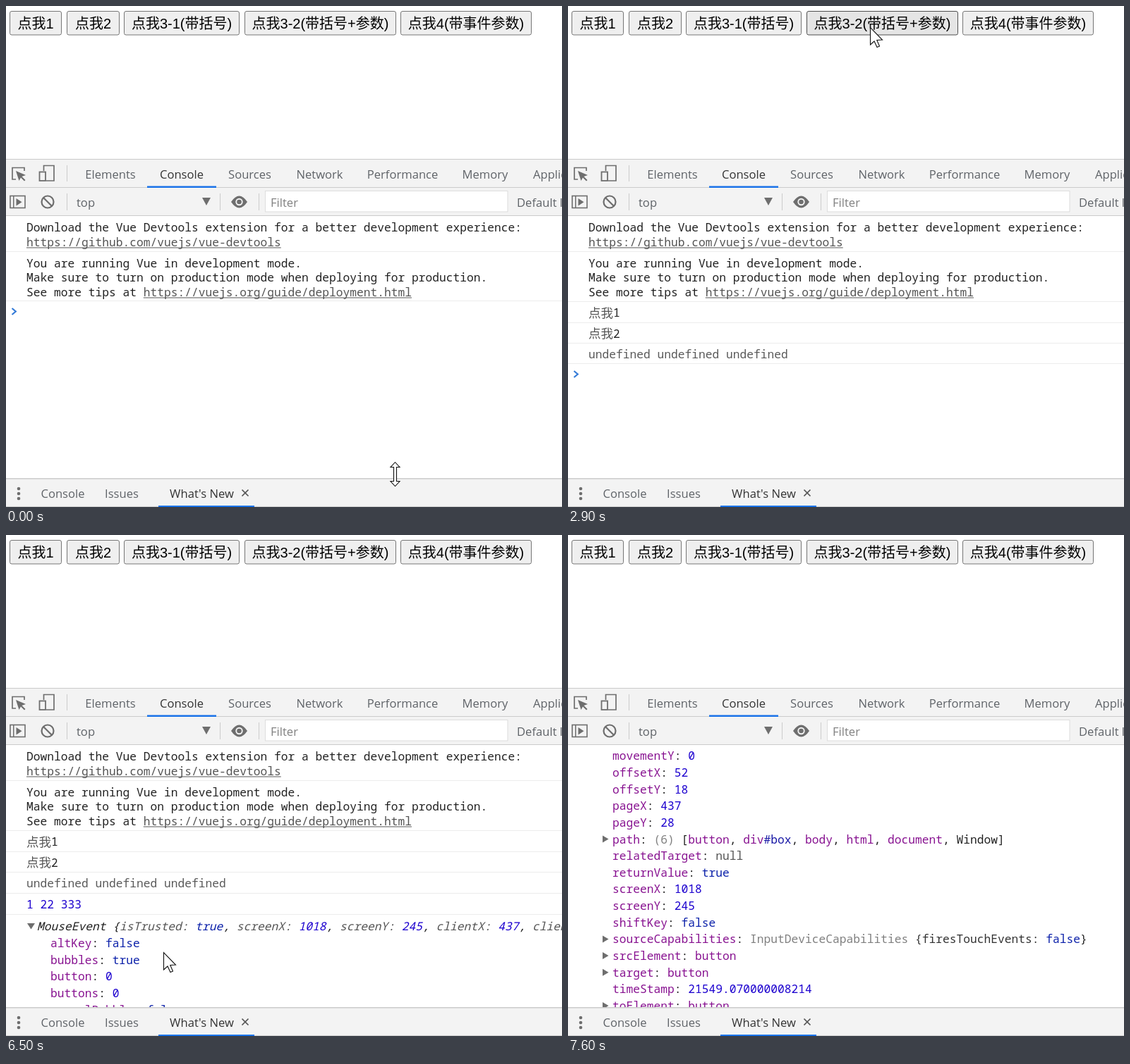
Write an HTML page with a canvas that moves like this. It is 788x711 px and loops after 8400 ms.

```html
<!DOCTYPE html>
<html lang="zh">
<head>
<meta charset="utf-8">
<title>Event handling demo</title>
<style>
html, body { margin: 0; width: 100%; height: 100%; overflow: hidden; background: #fff; }
canvas { display: block; }
</style>
</head>
<body>
<canvas id="stage" width="788" height="711"></canvas>
<script>
const ctx = document.getElementById('stage').getContext('2d');
const W = 788, H = 711, LOOP = 8400, STEP = 100;

const CJK = '"Noto Sans CJK SC", "Noto Sans CJK JP", "Noto Sans CJK"';
const UI = '16.6px "Open Sans", "Noto Sans", sans-serif';
const BUTTON = `20px "Liberation Sans", ${CJK}, sans-serif`;
const MONO = '16.25px "Noto Sans Mono", monospace';
const HAN = `300 17.5px ${CJK}, sans-serif`;

const INK = '#222', GRAY = '#565656', PURPLE = '#881391', NUM = '#1c00cf', BOOL = '#0d22aa';
const ICON = '#6e6e6e', BLUE = '#1a73e8', BAR = '#f3f3f3', EDGE = '#cbcbcb';

const buttons = [
  [5, 74, '点我1'], [86, 75, '点我2'], [167, 164, '点我3-1(带括号)'],
  [338, 215, '点我3-2(带括号+参数)'], [559, 186, '点我4(带事件参数)']
];
const clicks = [800, 1300, 2300, 3300, 4300];
const EXPAND = 5900;

// time, x, y of the pointer tip
const pointer = [
  [0, 551, 664], [300, 330, 350], [600, 55, 45], [700, 42, 30], [800, 44, 29], [900, 80, 30],
  [1000, 108, 30], [1300, 125, 29], [1600, 150, 30], [1700, 150, 30], [1900, 215, 30],
  [2000, 215, 30], [2100, 222, 29], [2600, 222, 29], [2900, 428, 30], [3300, 430, 31],
  [3800, 641, 36], [4300, 641, 36], [4500, 190, 562], [4900, 190, 562], [5100, 120, 605],
  [5300, 67, 563], [5500, 33, 555], [5900, 34, 555], [6000, 208, 590], [6200, 208, 590],
  [6500, 223, 592], [6800, 245, 590], [7100, 361, 573], [7600, 810, 560]
];
const scroll = [[6500, 0], [6700, 140], [6800, 140], [7100, 465.8], [7600, 739]];

const props = `altKey false,bubbles true,button 0,buttons 0,cancelBubble false,cancelable true,
clientX 437,clientY 28,composed true,ctrlKey false,currentTarget null,defaultPrevented false,
detail 1,eventPhase 0,fromElement null,isTrusted true,layerX 437,layerY 28,metaKey false,
movementX 0,movementY 0,offsetX 52,offsetY 18,pageX 437,pageY 28,path ,relatedTarget null,
returnValue true,screenX 1018,screenY 245,shiftKey false,sourceCapabilities ,srcElement button,
target button,timeStamp 21549.070000008214,toElement button`
  .split(',').map(p => p.trim().split(' '));

const rich = {
  path: [['(6) ', '#808080'], ['[', INK], ['button', PURPLE], [', ', INK], ['div', PURPLE],
    ['#box', '#1a1aa6'], [', ', INK], ['body', PURPLE], [', ', INK], ['html', PURPLE],
    [', ', INK], ['document', PURPLE], [', Window]', INK]],
  sourceCapabilities: [['InputDeviceCapabilities', '#808080'], [' {firesTouchEvents: ', '#333'],
    ['false', BOOL], ['}', INK]]
};

function track(keys, t, i) {
  if (t <= keys[0][0]) return keys[0][i];
  for (let k = 1; k < keys.length; k++) {
    const a = keys[k - 1], b = keys[k];
    if (t <= b[0]) return a[i] + (b[i] - a[i]) * (t - a[0]) / (b[0] - a[0]);
  }
  return keys[keys.length - 1][i];
}

function text(s, x, y, color = INK, font = MONO) {
  ctx.font = font;
  ctx.fillStyle = color;
  ctx.fillText(s, x, y);
  return x + ctx.measureText(s).width;
}

function runs(parts, x, y, font) {
  for (const [s, color] of parts) x = text(s, x, y, color, font);
}

function label(s, cx, y, color) {
  ctx.textAlign = 'center';
  text(s, cx, y, color, UI);
  ctx.textAlign = 'left';
}

function rect(x, y, w, h, color) {
  ctx.fillStyle = color;
  ctx.fillRect(x, y, w, h);
}

function poly(points, fill, stroke, width = 1) {
  ctx.beginPath();
  points.forEach(([x, y]) => ctx.lineTo(x, y));
  if (fill) {
    ctx.closePath();
    ctx.fillStyle = fill;
    ctx.fill();
  }
  if (stroke) {
    ctx.strokeStyle = stroke;
    ctx.lineWidth = width;
    ctx.stroke();
  }
}

function frame(x, y, w, h, color, width) {
  ctx.strokeStyle = color;
  ctx.lineWidth = width;
  ctx.strokeRect(x, y, w, h);
}

function disc(x, y, r, color) {
  ctx.beginPath();
  ctx.arc(x, y, r, 0, Math.PI * 2);
  ctx.fillStyle = color;
  ctx.fill();
}

function drawButtons(t, px, py) {
  buttons.forEach(([x, w, caption], i) => {
    const over = px >= x && px < x + w && py >= 7 && py < 41;
    const pressed = over && t >= clicks[i] - STEP && t < clicks[i];
    ctx.beginPath();
    ctx.roundRect(x + .5, 7.5, w - 1, 33.5, 2.5);
    ctx.fillStyle = pressed ? '#f5f5f5' : over ? '#e5e5e5' : '#efefef';
    ctx.fill();
    ctx.strokeStyle = pressed ? '#8d8d8d' : over ? '#4f4f4f' : '#767676';
    ctx.lineWidth = 1;
    ctx.stroke();
    ctx.textAlign = 'center';
    text(caption, x + w / 2, 32, '#000', BUTTON);
    ctx.textAlign = 'left';
  });
}

function drawTabs() {
  rect(0, 217, W, 81, BAR);
  for (const y of [217, 257, 297]) rect(0, y, W, 1, EDGE);
  rect(200, 255.5, 98, 2.5, BLUE);
  rect(86, 226, 1, 23, '#ccc');

  poly([[14, 246], [9, 246], [9, 229.5], [26, 229.5], [26, 234]], null, ICON, 1.7);
  poly([[14, 234], [28, 240], [22.5, 242], [27.5, 247], [26, 248.5], [21, 243.5], [18.5, 248]], ICON);
  poly([[53.5, 234], [53.5, 226.5], [68, 226.5], [68, 248], [57, 248]], null, ICON, 1.7);
  frame(47.5, 235.5, 8.5, 12.5, ICON, 1.8);

  label('Elements', 148, 245, '#5f6368');
  label('Console', 249, 245, '#333');
  label('Sources', 345.5, 245, '#5f6368');
  label('Network', 444.5, 245, '#5f6368');
  label('Performance', 562, 245, '#5f6368');
  label('Memory', 679, 245, '#5f6368');
  text('Application', 747, 245, '#5f6368', UI);
}

function drawFilterBar() {
  frame(6, 269.5, 21, 17, ICON, 1.6);
  rect(10, 269, 1.5, 18, ICON);
  poly([[14.5, 273], [22.5, 278.2], [14.5, 283.5]], ICON);
  ctx.beginPath();
  ctx.arc(59, 278, 8.5, 0, Math.PI * 2);
  ctx.strokeStyle = ICON;
  ctx.lineWidth = 2.2;
  ctx.stroke();
  poly([[53, 272], [65, 284]], null, ICON, 2.2);
  for (const x of [86, 303, 358]) rect(x, 266, 1, 24, '#ccc');

  text('top', 100, 285, '#5f6368', UI);
  poly([[278, 272], [290, 272], [284, 283]], ICON);

  ctx.beginPath();
  ctx.moveTo(319, 278);
  ctx.quadraticCurveTo(330.5, 261, 342, 278);
  ctx.quadraticCurveTo(330.5, 295, 319, 278);
  ctx.fillStyle = ICON;
  ctx.fill();
  disc(330.5, 278, 5.2, BAR);
  disc(330.5, 278, 3.3, ICON);

  rect(368, 262, 343, 30, '#fff');
  frame(367.5, 262.5, 343.5, 29.5, '#ddd', 1);
  text('Filter', 375, 285, '#808080', UI);
  text('Default levels', 724, 285, '#5f6368', UI);
}

function drawDrawer() {
  rect(0, 671, W, 40, BAR);
  rect(0, 670, W, 1.5, EDGE);
  rect(0, 710, W, 1, EDGE);
  rect(216, 709, 136, 2, BLUE);
  for (const y of [685, 692, 699]) disc(18, y, 2.3, ICON);
  label('Console', 80.5, 698, '#5f6368');
  label('Issues', 164, 698, '#5f6368');
  label("What's New", 277.5, 698, '#333');
  poly([[334.5, 686.5], [343.5, 695.5]], null, '#555', 1.7);
  poly([[343.5, 686.5], [334.5, 695.5]], null, '#555', 1.7);
}

function link(s, x, y) {
  const end = text(s, x, y, '#545454');
  rect(x, y + 1.5, end - x, 1, '#545454');
}

function twisty(x, y, open) {
  poly(open ? [[x - 6, y - 4], [x + 5, y - 4], [x - .5, y + 4.5]]
            : [[x - 4, y - 5], [x + 4.5, y], [x - 4, y + 5]], ICON);
}

function drawEvent(open) {
  twisty(36, 555, open);
  const parts = [['MouseEvent {', INK]];
  const preview = [['isTrusted', true], ['screenX', 1018], ['screenY', 245], ['clientX', 437], ['clientY', 28]];
  for (const [k, v] of preview)
    parts.push([k, GRAY], [': ', GRAY], [String(v), v === true ? BOOL : NUM], [', ', INK]);
  runs(parts, 44, 561, 'italic ' + MONO);
  if (!open) return;

  props.forEach(([key, value = ''], i) => {
    const y = 579 + i * 23.66;
    const color = value === 'null' ? GRAY : value === 'button' ? PURPLE : /\d/.test(value) ? NUM : BOOL;
    if (rich[key] || value === 'button') twisty(53, y, false);
    runs([[key, PURPLE], [': ', INK], ...(rich[key] || [[value, color]])], 63, y + 6);
  });
}

function drawConsole(t) {
  const count = clicks.filter(c => t >= c).length;
  const open = t >= EXPAND;
  ctx.save();
  ctx.beginPath();
  ctx.rect(0, 298, W, 372);
  ctx.clip();
  ctx.translate(0, -track(scroll, t, 1));

  text('Download the Vue Devtools extension for a better development experience:', 29, 320);
  link('https://github.com/vuejs/vue-devtools', 29, 341);
  text('You are running Vue in development mode.', 29, 371);
  text('Make sure to turn on production mode when deploying for production.', 29, 391);
  link('https://vuejs.org/guide/deployment.html', text('See more tips at ', 29, 412), 412);

  const rows = [
    () => text('1', text('点我', 29, 441.5, '#555', HAN), 441),
    () => text('2', text('点我', 29, 471, '#555', HAN), 471),
    () => text('undefined undefined undefined', 29, 500, '#5a5a5a'),
    () => text('1 22 333', 29, 530, NUM),
    () => drawEvent(open)
  ];
  rows.slice(0, count).forEach(draw => draw());

  rect(0, 348, W, 1, '#ececec');
  for (let i = 0; i < count; i++) rect(0, Math.round(419 + i * 29.7), W, 1, '#ececec');
  if (!open) {
    const last = count === 5 ? 569 : Math.round(418 + count * 29.5);
    rect(0, last, W, 1, '#ececec');
    const y = last + 15.5;
    poly([[8.5, y - 4.5], [13.8, y], [8.5, y + 4.5]], null, '#367cd8', 2.2);
  }
  ctx.restore();
}

function drawPointer(t, x, y) {
  const shape = t === 0
    ? [[0, -17], [6.5, -10], [2, -10], [2, 10], [6.5, 10], [0, 17], [-6.5, 10], [-2, 10], [-2, -10], [-6.5, -10], [0, -17]]
    : [[0, 0], [0, 24.5], [5.5, 19.5], [9.5, 28], [13, 26.5], [9.3, 18], [17, 17.5], [0, 0]];
  poly(shape.map(([dx, dy]) => [x + dx + .5, y + dy + .5]), '#fff', '#111', 1.1);
}

function draw(now) {
  const t = Math.floor(now % LOOP / STEP) * STEP;
  const px = track(pointer, t, 1), py = track(pointer, t, 2);
  rect(0, 0, W, H, '#fff');
  drawButtons(t, px, py);
  drawConsole(t);
  drawTabs();
  drawFilterBar();
  drawDrawer();
  drawPointer(t, px, py);
}

const start = performance.now();
function tick() {
  draw(performance.now() - start);
  requestAnimationFrame(tick);
}
tick();
</script>
</body>
</html>
```
